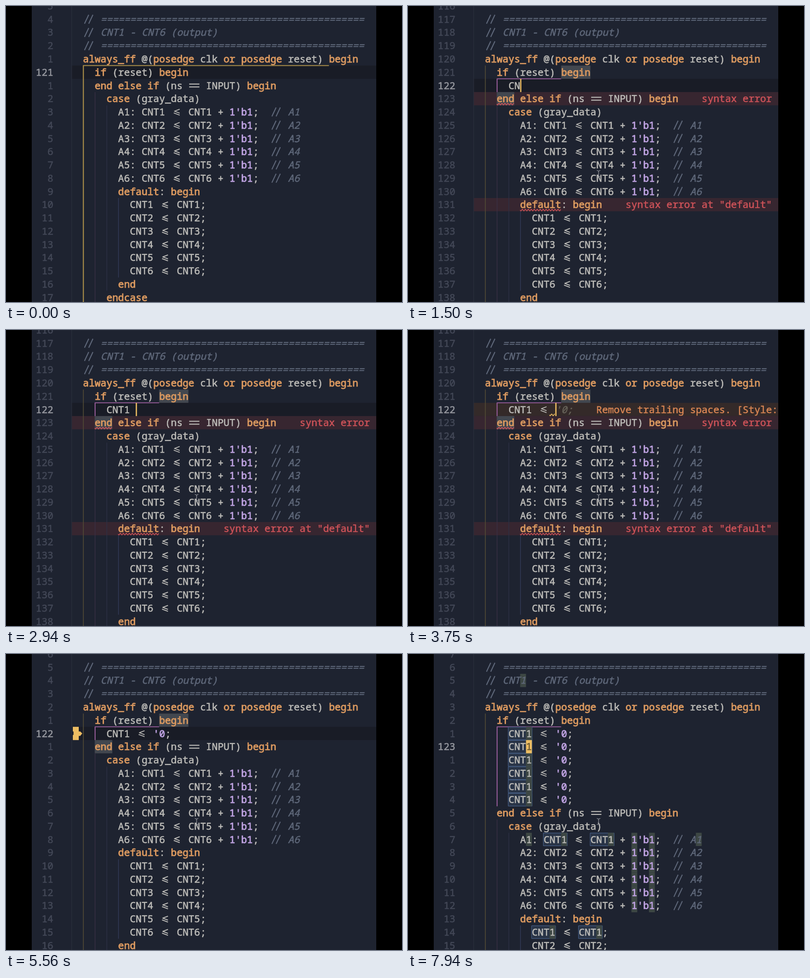
An HTML page with a canvas for the animation above (8000 ms loop, 800 by 598 pixels).

```html
<!DOCTYPE html>
<html lang="en">
<head>
<meta charset="utf-8">
<title>Editing a counter block</title>
<style>
  html, body { margin: 0; width: 100%; height: 100%; overflow: hidden; background: #000; }
  canvas { display: block; width: 800px; height: 598px; }
</style>
</head>
<body>
<canvas id="stage" width="800" height="598"></canvas>
<script>
const ctx = document.getElementById('stage').getContext('2d');
const LOOP = 8000;
const LEFT = 52, RIGHT = 748, GUTTER = 133;
const X0 = 155.6, CW = 11.83, Y0 = 26.7, LH = 26.76;
const FONT = '19.7px "Noto Sans Mono", "DejaVu Sans Mono", monospace';
const MEDIUM = .55, HEAVY = .9;

const C = {
  bg: '#1e2330', text: '#bfbeba', keyword: '#dc9a60', literal: '#bda1df',
  comment: '#5f687a', number: '#434857', current: '#9799a0', active: '#191c26',
  error: '#cf5359', errorRow: '#372630', warn: '#d98654', warnRow: '#342a29',
  pair: '#42474f', cursor: '#edbd62', yellow: '#b0934a', dimYellow: '#514a35',
  purple: '#935a96', dimPurple: '#3b3045', guide: '#2d3144', innerGuide: '#343b5a',
  word: '#293447', wordEdge: '#4b6690', match: '#3d4744'
};

const rule = '// ' + '='.repeat(45);
const head = [
  rule, '// CNT1 - CNT6 (output)', rule,
  'always_ff @(posedge clk or posedge reset) begin',
  '  if (reset) begin'
];
const ids = [1, 2, 3, 4, 5, 6];
const tail = [
  '  end else if (ns == INPUT) begin',
  '    case (gray_data)',
  ...ids.map(i => `      A${i}: CNT${i} <= CNT${i} + 1'b1;  // A${i}`),
  '      default: begin',
  ...ids.map(i => `        CNT${i} <= CNT${i};`),
  '      end',
  '    endcase'
];
const full = "    CNT1 <= '0;";
const typed = n => [full.slice(0, 4 + n)];

// Each step overrides part of the editor state from its time on.
const steps = [
  [0, { added: [], cur: 4, relative: true, active: true }],
  [480, { added: typed(0), cur: 5, relative: false, bar: true, pair: true, scope: true }],
  [600, { mouse: true }],
  [1050, { errors: true }],
  [1330, { added: typed(1) }],
  [1450, { added: typed(2) }],
  [1750, { added: typed(3) }],
  [1950, { added: typed(4) }],
  [2650, { added: typed(5) }],
  [2950, { added: typed(6) }],
  [3100, { added: typed(7) }],
  [3380, { added: typed(8) }],
  [3500, { warn: true }],
  [4350, { added: [full], warn: false }],
  [4550, { errors: false }],
  [4700, { relative: true, bar: false, block: 14 }],
  [5000, { block: null }],
  [5100, { badge: true }],
  [5850, { badge: false }],
  [6050, { added: Array(6).fill(full), cur: 6 }],
  [6700, { words: true }],
  [7450, { block: 7, pair: false }],
  [7650, { ones: true, active: false }]
];

const stateAt = t => Object.assign({}, ...steps.filter(s => s[0] <= t).map(s => s[1]));
const colX = col => X0 + col * CW;
const rowY = row => Y0 + row * LH;
const rowTop = row => rowY(row) - LH / 2;

function fill(color, x, y, w, h) {
  ctx.fillStyle = color;
  ctx.fillRect(x, y, w, h);
}

function stroke(color, width, points) {
  ctx.strokeStyle = color;
  ctx.lineWidth = width;
  ctx.beginPath();
  points.forEach(([x, y]) => ctx.lineTo(x, y));
  ctx.stroke();
}

function cells(color, row, col, count) {
  fill(color, colX(col), rowTop(row), count * CW, LH);
}

function rowBand(color, row) {
  fill(color, GUTTER, rowTop(row), RIGHT - GUTTER, LH);
}

// A thin outline gives weights between regular and bold.
function text(str, x, y, color, weight = MEDIUM, style = 'normal') {
  ctx.font = `${style} 400 ${FONT}`;
  ctx.fillStyle = ctx.strokeStyle = color;
  ctx.lineWidth = weight;
  [...str].forEach((ch, i) => {
    if (ch === ' ') return;
    ctx.fillText(ch, x + i * CW, y + 7);
    ctx.strokeText(ch, x + i * CW, y + 7);
  });
}

function squiggle(color, row, col, count) {
  const points = [];
  for (let x = 0; x <= count * CW; x++) {
    points.push([colX(col) + x, rowY(row) + 11 + 1.7 * Math.sin(x * Math.PI / 3)]);
  }
  stroke(color, 1.5, points);
}

// Two-cell signs are drawn joined.
function lessEqual(x, y) {
  const c = x + CW;
  stroke(C.text, 1.8, [[c + 6, y - 5.5], [c - 4.5, y - 1.5], [c + 6, y + 2.5]]);
  stroke(C.text, 1.8, [[c - 6, y + 2], [c + 6, y + 6.5]]);
}

function doubleEqual(x, y) {
  for (const dy of [-2.8, 3]) fill(C.text, x + 1.5, y + dy - 1, 2 * CW - 3, 2);
}

function slashes(x, y) {
  for (const dx of [3, 11.5]) stroke(C.comment, 2, [[x + dx, y + 9], [x + dx + 8.5, y - 9]]);
}

const tokenPattern = /(\/\/.*)|\b(always_ff|posedge|or|begin|if|end|else|case|endcase|default)\b|(1'b1|'0)|(<=|==)|\w+|[^\s\w]/g;

function codeLine(line, row) {
  const y = rowY(row);
  for (const m of line.matchAll(tokenPattern)) {
    const [str, comment, keyword, literal, operator] = m;
    const x = colX(m.index);
    if (comment) {
      slashes(x, y);
      text(str.slice(2), x + 2 * CW, y, C.comment, MEDIUM, 'italic');
    } else if (operator) {
      (operator === '<=' ? lessEqual : doubleEqual)(x, y);
    } else if (keyword) {
      text(str, x, y, C.keyword, HEAVY);
    } else if (literal) {
      text(str, x, y, C.literal, HEAVY);
    } else {
      text(str, x, y, C.text);
    }
  }
}

function lineNumbers(s) {
  for (let row = -1; row < 22; row++) {
    const current = row === s.cur;
    const label = String(s.relative && !current ? Math.abs(row - s.cur) : 117 + row);
    text(label, 95.6 - label.length * CW, rowY(row), current ? C.current : C.number);
  }
}

function guides(s, endRow) {
  const vertical = (color, col, from, to, width = 1.3) =>
    stroke(color, width, [[colX(col) + .7, rowTop(from)], [colX(col) + .7, rowTop(to)]]);
  vertical(C.dimPurple, 2, endRow + 1, 23);
  vertical(C.guide, 4, endRow + 2, endRow + 16);
  vertical(C.innerGuide, 6, endRow + 9, endRow + 15);
  if (s.scope) {
    vertical(C.dimYellow, 0, 4, 23, 1.6);
    vertical(C.purple, 2, 5, endRow, 2);
    stroke(C.purple, 1.6, [[colX(2), rowTop(5)], [colX(13), rowTop(5)]]);
  } else {
    vertical(C.yellow, 0, 4, 23, 2);
    stroke(C.yellow, 1.6, [[colX(0), rowTop(4)], [colX(42), rowTop(4)]]);
  }
}

function highlights(s, lines) {
  const each = (pattern, paint) => lines.forEach((line, row) => {
    for (const m of line.matchAll(pattern)) paint(row, m.index);
  });
  if (s.words) each(/CNT1/g, (row, col) => {
    if (row < head.length) return;
    cells(C.word, row, col, 4);
    ctx.strokeStyle = C.wordEdge;
    ctx.lineWidth = 1;
    ctx.strokeRect(colX(col) - .5, rowTop(row) + .5, 4 * CW + 1, LH - 1);
  });
  if (s.ones) each(/1/g, (row, col) => cells(C.match, row, col, 1));
}

function badge(row) {
  const y = rowY(row);
  fill(C.cursor, 135, rowTop(row), 12, LH);
  fill(C.bg, 135, y - 4, 1.5, 7);
  ctx.fillStyle = C.cursor;
  ctx.beginPath();
  [[146, y - 4], [150, y - 4], [154, y], [150, y + 5], [146, y + 5]].forEach(p => ctx.lineTo(...p));
  ctx.fill();
}

function mouse() {
  stroke('#9a9ca2', 1.2, [[385, 333], [385, 344]]);
  for (const [edge, mid] of [[332, 333.5], [345, 343.5]]) {
    stroke('#9a9ca2', 1.2, [[381.5, edge], [385, mid], [388.5, edge]]);
  }
}

function draw(t) {
  const s = stateAt(t);
  const lines = [...head, ...s.added, ...tail];
  const endRow = head.length + s.added.length;
  const defaultRow = endRow + 8;

  fill('#000', 0, 0, 800, 598);
  ctx.save();
  ctx.lineJoin = 'round';
  ctx.beginPath();
  ctx.rect(LEFT, 0, RIGHT - LEFT, 598);
  ctx.clip();
  fill(C.bg, LEFT, 0, RIGHT - LEFT, 598);

  if (s.active) rowBand(s.warn ? C.warnRow : C.active, s.cur);
  if (s.errors) [endRow, defaultRow].forEach(row => rowBand(C.errorRow, row));
  fill('#2a2e3b', GUTTER - 1, 0, 1.3, 598);
  if (s.pair) {
    cells(C.pair, 4, 13, 5);
    cells(C.pair, endRow, 2, 3);
  }
  guides(s, endRow);
  highlights(s, lines);
  lineNumbers(s);
  lines.forEach(codeLine);

  if (s.errors) {
    squiggle(C.error, endRow, 2, 3);
    squiggle(C.error, defaultRow, 6, 7);
    text('syntax error at "end"', colX(37), rowY(endRow), C.error);
    text('syntax error at "default"', colX(24), rowY(defaultRow), C.error);
  }
  if (s.warn) {
    text("'0;", colX(12), rowY(5), '#666259', MEDIUM, 'italic');
    text('Remove trailing spaces. [Style: spaces]', colX(19), rowY(5), C.warn);
    squiggle(C.cursor, 5, 11, 1);
  }
  if (s.bar) fill(C.cursor, colX(s.added[0].length), rowTop(5), 2.5, LH);
  if (s.block) {
    cells(C.cursor, s.cur, s.block, 1);
    text(lines[s.cur][s.block], colX(s.block), rowY(s.cur), '#6b572f');
  }
  if (s.badge) badge(s.cur);
  if (s.mouse) mouse();
  ctx.restore();
}

const start = performance.now();
function tick() {
  draw((performance.now() - start) % LOOP);
  requestAnimationFrame(tick);
}
tick();
</script>
</body>
</html>
```
